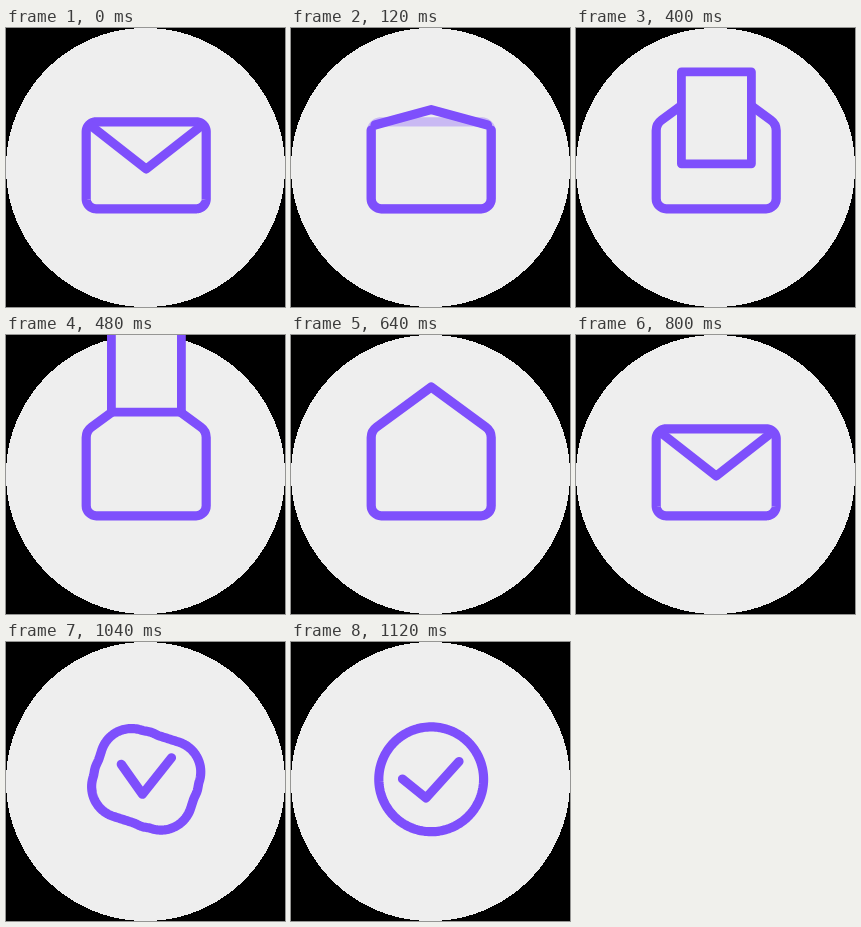
Write an HTML page with a canvas that moves like this. It is 279 px wide and 279 px high and loops after 2.12 s.

```html
<!DOCTYPE html>
<html lang="en">
<head>
<meta charset="utf-8">
<title>Envelope to check mark</title>
<style>
  html, body { margin: 0; width: 100%; height: 100%; overflow: hidden; background: #000; }
  canvas { display: block; width: 279px; height: 279px; }
</style>
</head>
<body>
<canvas id="stage"></canvas>
<script>
const SIZE = 279, LOOP = 2120, STEP = 40;
const PURPLE = '#7e4ffc', PALE = '#eeeeee', WEIGHT = 9.2;
const CX = 140.2, CY = 137.3;

const canvas = document.getElementById('stage');
const ctx = canvas.getContext('2d');
const ratio = window.devicePixelRatio || 1;
canvas.width = canvas.height = Math.round(SIZE * ratio);

// Half width, half height, corner radius, tilt in degrees, bulge after each corner
const BOX = [60, 43.5, 10, 0, 0];
const TURN = [50, 38.3, 10, 10.5, 1.8];
const RING = [52.4, 52.4, 52.4, 25, 0];

// Flap or check mark: left end, tip, right end
const FLAP = [84, 97, CX, 141, 196.5, 97];
const FLAP_TURN = [119, 107.5, 138, 148.5, 163, 112];
const CHECK = [111.5, 137, 135, 156, 168, 119.5];

const mix = (a, b, p) => a + (b - a) * p;
const mixAll = (a, b, p) => a.map((v, i) => mix(v, b[i], p));
const ramp = (t, start, end) => Math.min(1, Math.max(0, (t - start) / (end - start)));

function morph(a, b, c, p) {
  const key = 3 / 7;
  return p < key ? mixAll(a, b, p / key) : mixAll(b, c, (p - key) / (1 - key));
}

function strokeOutline([w, h, r, tilt, lift]) {
  const steps = 40, bulgeLength = 20;
  ctx.beginPath();
  for (let side = 0; side < 4; side++) {
    const [half, depth] = side % 2 ? [h, w] : [w, h];
    const turn = tilt * Math.PI / 180 + side * Math.PI / 2;
    const cos = Math.cos(turn), sin = Math.sin(turn);
    const add = (x, y) => ctx.lineTo(CX + x * cos - y * sin, CY + x * sin + y * cos);
    for (let i = 0; i <= steps; i++) {
      const d = 2 * (half - r) * i / steps;
      const bulge = d < bulgeLength ? lift * Math.sin(Math.PI * d / bulgeLength) ** 2 : 0;
      add(r - half + d, -depth - bulge);
    }
    for (let i = 1; i <= steps; i++) {
      const a = Math.PI / 2 * i / steps;
      add(half - r + r * Math.sin(a), r - depth - r * Math.cos(a));
    }
  }
  ctx.closePath();
  ctx.stroke();
}

function strokeMark([x1, y1, x2, y2, x3, y3]) {
  ctx.beginPath();
  ctx.moveTo(x1, y1);
  ctx.lineTo(x2, y2);
  ctx.lineTo(x3, y3);
  ctx.stroke();
}

function strokePocket(open) {
  const [w, h, r] = BOX;
  const left = CX - w, right = CX + w, bottom = CY + h, shoulder = 96;
  ctx.beginPath();
  ctx.moveTo(CX, bottom);
  ctx.arcTo(left, bottom, left, shoulder, r);
  if (open === 1) {
    ctx.arcTo(left, shoulder, CX, 52, 13);
    ctx.lineTo(CX, 52);
    ctx.arcTo(right, shoulder, right, bottom, 13);
  } else {
    ctx.lineTo(left, 102);
    ctx.moveTo(right, 102);
  }
  ctx.arcTo(right, bottom, CX, bottom, r);
  ctx.lineTo(CX, bottom);
  ctx.stroke();
}

function drawEnvelope(open) {
  if (open > 0) strokePocket(open);
  if (open === 1) return;
  ctx.globalAlpha = 1 - open;
  strokeOutline(BOX);
  ctx.globalAlpha = 1;
  const flap = [...FLAP];
  flap[3] = mix(flap[3], 52, open);
  strokeMark(flap);
}

function drawPaper(t) {
  if (t < 320 || t >= 640) return;
  const grow = ramp(t, 280, 360);
  const shift = 88 * ramp(t, 360, 480) + 90 * ramp(t, 520, 640);
  ctx.save();
  ctx.globalAlpha = grow;
  ctx.beginPath();
  ctx.rect(0, 0, SIZE, grow < 1 ? mix(57, 169.5, grow) : SIZE);
  ctx.clip();
  ctx.beginPath();
  ctx.rect(105.4, 73.2 - shift, 70, 92);
  ctx.fillStyle = PALE;
  ctx.fill();
  ctx.lineWidth = 8.8;
  ctx.stroke();
  ctx.restore();
}

// Whole-pixel rows give the disc its hard edge
function drawDisc() {
  const r = SIZE / 2;
  ctx.fillStyle = PALE;
  for (let y = 0; y < SIZE; y++) {
    const x = Math.round(r - Math.sqrt(r * r - (y + 0.5 - r) ** 2));
    ctx.fillRect(x, y, SIZE - 2 * x, 1);
  }
}

function draw(t) {
  ctx.setTransform(canvas.width / SIZE, 0, 0, canvas.height / SIZE, 0, 0);
  ctx.fillStyle = '#000';
  ctx.fillRect(0, 0, SIZE, SIZE);
  drawDisc();

  ctx.strokeStyle = PURPLE;
  ctx.lineWidth = WEIGHT;
  ctx.lineCap = ctx.lineJoin = 'round';

  const turn = ramp(t, 840, 1120);
  if (turn > 0) {
    strokeOutline(morph(BOX, TURN, RING, turn));
    strokeMark(morph(FLAP, FLAP_TURN, CHECK, turn));
  } else {
    drawEnvelope(ramp(t, 40, 160) * (1 - ramp(t, 680, 800)));
    drawPaper(t);
  }
}

const begin = performance.now();
function tick() {
  const t = (performance.now() - begin) % LOOP;
  draw(Math.floor(t / STEP) * STEP);
  requestAnimationFrame(tick);
}
tick();
</script>
</body>
</html>
```
